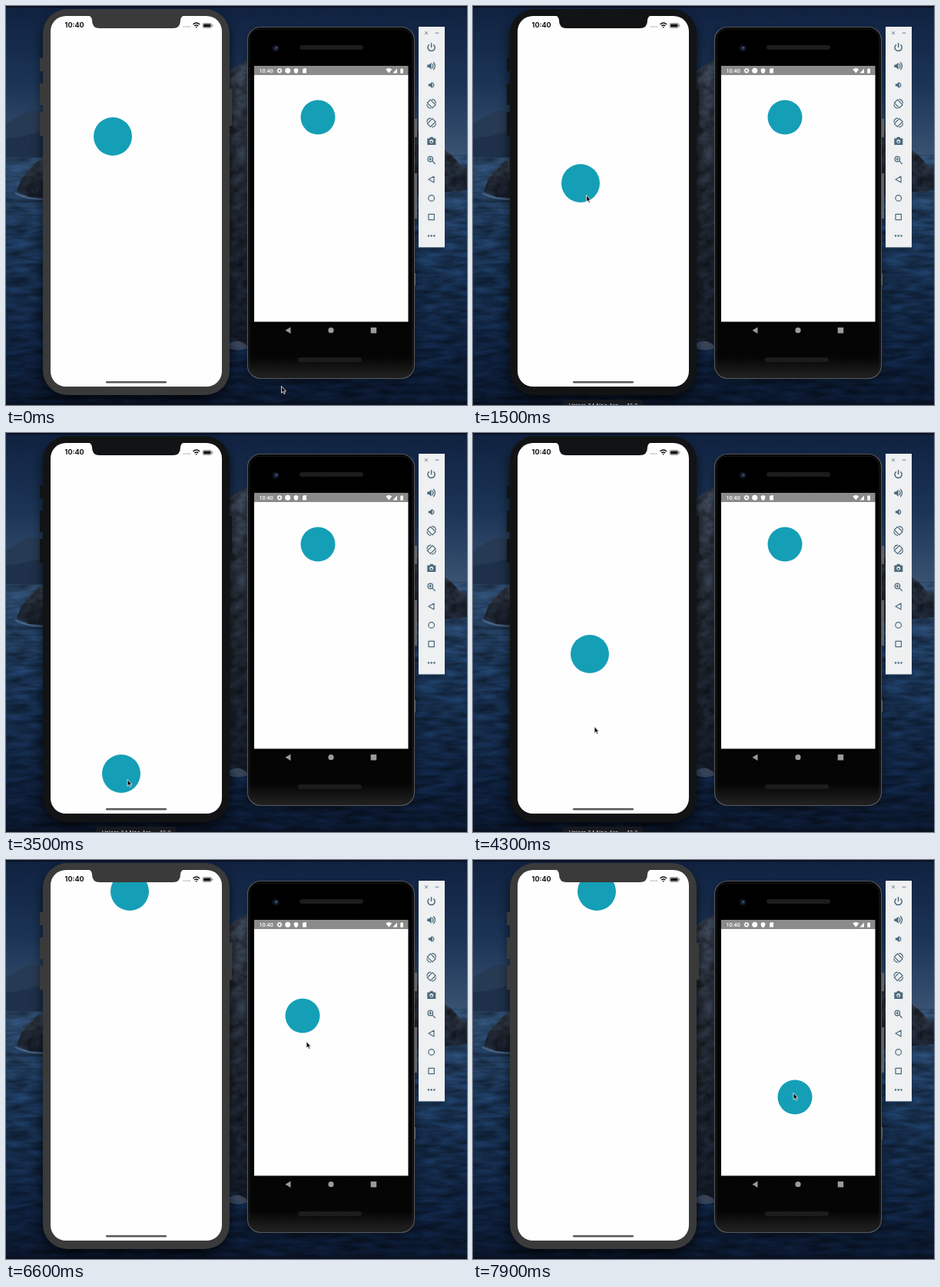
Write an HTML page that moves like this. It is 600x520 px and loops after 8 s.

```html
<!DOCTYPE html>
<html lang="en">
<head>
<meta charset="utf-8">
<title>Dragging on two phones</title>
<style>
html, body { margin: 0; width: 100%; height: 100%; overflow: hidden; background: #0c1a30; }
svg { position: absolute; left: 0; top: 0; width: 600px; height: 520px; }
.line { fill: none; stroke: #4c697c; stroke-width: 1.2; stroke-linejoin: round; stroke-linecap: round; }
.solid { fill: #4c697c; }
</style>
</head>
<body>
<!-- night coast -->
<svg viewBox="0 0 600 520">
  <defs>
    <linearGradient id="sky" x2="0" y2="1">
      <stop offset="0" stop-color="#10213f"/>
      <stop offset=".5" stop-color="#1b3456"/>
      <stop offset="1" stop-color="#3b5473"/>
    </linearGradient>
    <linearGradient id="sea" x2="0" y2="1">
      <stop offset="0" stop-color="#2a4565"/>
      <stop offset=".35" stop-color="#193353"/>
      <stop offset=".8" stop-color="#0e203c"/>
      <stop offset="1" stop-color="#0a162b"/>
    </linearGradient>
    <linearGradient id="rock" x2="0" y2="1">
      <stop offset="0" stop-color="#353e4d"/>
      <stop offset=".5" stop-color="#222934"/>
      <stop offset="1" stop-color="#151d2b"/>
    </linearGradient>
    <filter id="rough" x="0" y="0" width="1" height="1" color-interpolation-filters="sRGB">
      <feTurbulence type="fractalNoise" baseFrequency=".07 .09" numOctaves="4" seed="4"/>
      <feColorMatrix values="1.6 0 0 0 -.3  1.6 0 0 0 -.3  1.6 0 0 0 -.3  0 0 0 0 .4"/>
      <feComposite in2="SourceGraphic" operator="in" result="grain"/>
      <feBlend in="grain" in2="SourceGraphic" mode="overlay"/>
    </filter>
    <filter id="ripple" x="0" y="0" width="1" height="1" color-interpolation-filters="sRGB">
      <feTurbulence type="fractalNoise" baseFrequency=".03 .14" numOctaves="3" seed="9"/>
      <feColorMatrix values="1.4 0 0 0 -.2  1.4 0 0 0 -.2  1.4 0 0 0 -.2  0 0 0 0 .4"/>
      <feBlend in2="SourceGraphic" mode="overlay"/>
    </filter>
    <filter id="blur" x="-20%" y="-20%" width="140%" height="140%"><feGaussianBlur stdDeviation="7"/></filter>
  </defs>
  <rect width="600" height="200" fill="url(#sky)"/>
  <rect y="194" width="600" height="326" fill="url(#sea)" filter="url(#ripple)"/>
  <g id="stars" fill="#a9bcda"></g>
  <path d="M0 153L14 145 27 137 38 136 52 141V195H0Z" fill="#273a54"/>
  <path d="M0 173L20 170 50 163V197H0Z" fill="#1e304a"/>
  <path d="M12 244Q28 252 50 252" fill="none" stroke="#7188a3" stroke-width="2" opacity=".5"/>
  <g fill="url(#rock)" filter="url(#rough)">
    <path d="M14 242L20 225 30 213 40 203 50 198V250L30 249Z"/>
    <path d="M284 92L300 78 320 68V446L302 444 284 425Z"/>
    <path d="M528 150L545 158 571 188 580 194 590 205 600 212V240L560 244 528 250Z"/>
  </g>
  <path d="M290 440q12-7 22 1l3 5q-14 5-25 0Z" fill="#6d7f99" opacity=".45"/>
  <rect width="600" height="2" fill="#0a1020"/>
  <rect y="517" width="600" height="3" fill="#0a1222"/>
  <g filter="url(#blur)" opacity=".6">
    <rect x="46" y="12" width="247" height="502" rx="35"/>
    <rect x="313" y="36" width="220" height="456" rx="20" opacity=".6"/>
  </g>
</svg>

<svg viewBox="0 0 600 520">
  <defs>
    <linearGradient id="chin" x2="0" y2="1">
      <stop offset="0" stop-color="#000"/>
      <stop offset=".94" stop-color="#050505"/>
      <stop offset="1" stop-color="#242424"/>
    </linearGradient>
    <clipPath id="leftScreen"><rect x="58" y="13" width="223" height="483" rx="20"/></clipPath>
    <clipPath id="rightScreen"><rect x="323" y="90" width="200.5" height="321.5"/></clipPath>
  </defs>

  <!-- left phone -->
  <g id="frame">
    <path d="M44 68h6v17h-6zM44 101h6v28h-6zM44 138h6v31h-6zM289 108h5v48h-5z"/>
    <rect x="48" y="4" width="243" height="503" rx="32"/>
  </g>
  <rect x="58" y="13" width="223" height="483" rx="20" fill="#fefefe"/>
  <g clip-path="url(#leftScreen)"><circle id="leftDot" r="25" fill="#149fb6"/></g>
  <path id="notch" d="M107 12Q112 14 112 19Q112 29 122 29H217Q227 29 227 19Q227 14 232 12Z"/>
  <text x="76.5" y="28.2" font-family="Inter, sans-serif" font-size="9" font-weight="700" fill="#111">10:40</text>
  <g fill="#999"><circle cx="231.5" cy="27" r=".8"/><circle cx="234" cy="27" r=".8"/><circle cx="236.5" cy="27" r=".8"/><circle cx="239" cy="27" r=".8"/></g>
  <path d="M243.5 24q4.3-3.8 8.600 0M245.3 26q2.5-2.2 5 0" fill="none" stroke="#111" stroke-width="1.4"/>
  <path d="M246.5 27.5q1.3-1 2.6 0l-1.3 1.3Z" fill="#111"/>
  <rect x="256" y="22.5" width="11.5" height="6" rx="1.5" fill="none" stroke="#777" stroke-width=".7"/>
  <rect x="257" y="23.5" width="9.5" height="4" rx=".7" fill="#111"/>
  <rect x="268.3" y="24.3" width="1" height="2.4" fill="#777"/>
  <rect x="130" y="489" width="79" height="2.4" rx="1.2" fill="#58585b"/>
  <g id="label">
    <rect x="117" y="513" width="104" height="16" rx="3" fill="#17191f"/>
    <text x="125" y="523.5" font-family="Inter, sans-serif" font-size="7.4" fill="#e2e2e4">Velora 24 Neo Arc — 13.2</text>
  </g>

  <!-- right phone -->
  <path d="M530 147h5v24h-5zM530 218h5v59h-5zM530 348h3v16h-3z" fill="#606469"/>
  <rect x="314.500" y="27.500" width="217" height="458" rx="17" fill="url(#chin)" stroke="#55585c" stroke-width="1.2"/>
  <rect x="317" y="30" width="212" height="453" rx="14" fill="none" stroke="#1c1c1d"/>
  <circle cx="351" cy="55" r="4.5" fill="#10131a"/>
  <circle cx="351.5" cy="55" r="2.2" fill="#23355e"/><circle cx="352.3" cy="54.2" r=".7" fill="#7385b1"/>
  <rect x="382" y="51" width="83" height="6" rx="3" fill="#1c1c1c"/>
  <rect x="380" y="458" width="83" height="6" rx="3" fill="#1c1c1c"/>
  <rect x="323" y="78" width="200.5" height="12" fill="#8b8b8b"/>
  <rect x="323" y="90" width="200.5" height="321.5" fill="#fefefe"/>
  <g fill="#fff">
    <text x="329.5" y="87" font-family="Roboto, sans-serif" font-size="7.2" font-weight="500">10:40</text>
    <circle cx="356" cy="84.3" r="2.1" fill="none" stroke="#fff" stroke-width="1.5"/>
    <circle cx="356" cy="84.3" r="3" fill="none" stroke="#fff" stroke-width=".9" stroke-dasharray="1.1 1.26"/>
    <circle cx="366.7" cy="84.3" r="3.5"/>
    <path d="M374.7 82.2l2.800-1.2 2.8 1.2v2q0 2.6-2.8 3.9-2.8-1.3-2.8-3.9ZM387.5 81.3h3.5v6.3h-5v-4.8Z"/>
    <path d="M494.3 82.6q4-3 8 0l-4 5ZM503.5 87.5l5.5-6v6ZM513.3 82h1v-.8h1.6v.8h1v5.7h-3.6Z"/>
  </g>
  <g fill="#9b9b9b"><path d="M363.5 422.7l7-4.2v8.4Z"/><circle cx="423" cy="422.7" r="3.6"/><rect x="474.7" y="419" width="7.5" height="7.5"/></g>
  <g clip-path="url(#rightScreen)"><circle id="rightDot" r="22.5" fill="#149fb6"/></g>

  <!-- tool strip -->
  <rect x="537" y="27" width="34" height="287.5" fill="#eef0f1"/>
  <g class="line">
    <path d="M545.3 33.5l3.4 3.4m0-3.4l-3.4 3.4M559 35.2h4" stroke-width=".8"/>
    <path d="M550.4 50.7a4.6 4.6 0 1 0 6.4 0M553.6 48.8v4.8" stroke-width="1.5"/>
    <path d="M555 75.5q2 2.7 0 5.4M556.5 73.5q4 4.7 0 9.4M555.8 100.5q2 2.5 0 5"/>
    <g id="turn">
      <rect x="-4.7" y="-2.9" width="9.4" height="5.8" transform="rotate(45)"/>
      <path d="M1-5.8Q5.3-5.300 5.800-1M-1 5.8Q-5.3 5.3-5.8 1"/>
    </g>
    <use href="#turn" transform="translate(1107.4 24.5) scale(-1 1)"/>
    <circle cx="552.3" cy="199.5" r="3.3"/><path d="M555 202.2l3.3 3.3M550.7 199.5h3.2M552.3 197.9v3.2"/>
    <path d="M550 226l7-3.9v7.8Z"/>
    <circle cx="553.7" cy="250.4" r="3.8"/>
    <rect x="550" y="271.3" width="7.4" height="7.4"/>
  </g>
  <g class="solid">
    <path d="M548.3 76.5h2.3l3-2.8v9l-3-2.8h-2.3ZM549.8 101.5h2l3-2.7v8.4l-3-2.7h-2Z"/>
    <path fill-rule="evenodd" d="M548.3 172.5h2.7l1.3-1.7h3l1.3 1.7h2.7v8.5h-11ZM553.7 174a2.5 2.5 0 1 0 .1 0Z"/>
    <circle cx="553.7" cy="177" r="1.3"/>
    <circle cx="550" cy="299.5" r="1.2"/><circle cx="553.7" cy="299.5" r="1.2"/><circle cx="557.4" cy="299.5" r="1.2"/>
  </g>

  <path id="cursor" d="M0-4.5V4.3L2 2.4 3.4 5.5 4.9 4.8 3.5 1.9H6Z" fill="#090909" stroke="#fff" stroke-width=".8" stroke-linejoin="round"/>
</svg>
<script>
const $ = id => document.getElementById(id);
const place = (id, [x, y]) => $(id).setAttribute('transform', `translate(${x} ${y})`);
const linear = u => u;
const smooth = u => u * u * (3 - 2 * u);
const glide = u => 1 - (1 - u) ** 2;

// Each key: time, x, y, easing used to arrive there.
const leftPath = [
  [0, 139, 170], [1000, 139, 170], [1500, 140, 231, smooth], [2700, 147, 402, smooth],
  [3400, 150, 444, glide], [3900, 150, 444], [4150, 151, 375, smooth],
  [4300, 152, 288], [5000, 161, 41, glide]
];
const rightPath = [
  [0, 406, 145], [5700, 406, 145], [6200, 392, 181, smooth],
  [6600, 386, 203, glide], [7200, 407, 302, smooth], [7900, 419, 309, glide]
];
const cursorPath = [
  [0, 358.5, 500], [900, 146, 185, smooth], [1000, 146, 185],
  [1500, 147.5, 251, smooth], [2700, 155, 416, smooth], [3400, 158, 456, glide],
  [3900, 158, 456], [4200, 158, 387, smooth], [4500, 158, 387],
  [5400, 401.5, 159.5, smooth], [5700, 401.5, 159.5], [6400, 391, 241, smooth],
  [6600, 391, 241], [7200, 406, 302, smooth], [7900, 417, 308, glide]
];

function along(keys, t) {
  const i = keys.findIndex(k => k[0] > t);
  if (i < 0) return keys.at(-1).slice(1, 3);
  const [t0, x0, y0] = keys[i - 1];
  const [t1, x1, y1, ease = linear] = keys[i];
  const u = ease((t - t0) / (t1 - t0));
  return [x0 + (x1 - x0) * u, y0 + (y1 - y0) * u];
}

let seed = 7;
const random = () => (seed = seed * 16807 % 2147483647) / 2147483647;
$('stars').innerHTML = Array.from({ length: 45 }, () =>
  `<circle cx="${random() * 600}" cy="${4 + random() * 120}" r="${.2 + random() * .4}" opacity="${.2 + random() * .4}"/>`
).join('');
// The strip reuses this icon mirrored, so its own offset comes first.
place('turn', [553.7, 127.5]);

function draw(t) {
  const focused = t >= 1000 && t < 5700;
  const shade = focused ? '#121314' : '#3a3a3a';
  $('frame').setAttribute('fill', shade);
  $('notch').setAttribute('fill', shade);
  $('label').style.visibility = focused ? 'visible' : 'hidden';
  place('leftDot', along(leftPath, t));
  place('rightDot', along(rightPath, t));
  place('cursor', along(cursorPath, t));
}

const start = performance.now();
function tick() {
  draw(Math.floor((performance.now() - start) % 8000 / 100) * 100);
  requestAnimationFrame(tick);
}
tick();
</script>
</body>
</html>
```
